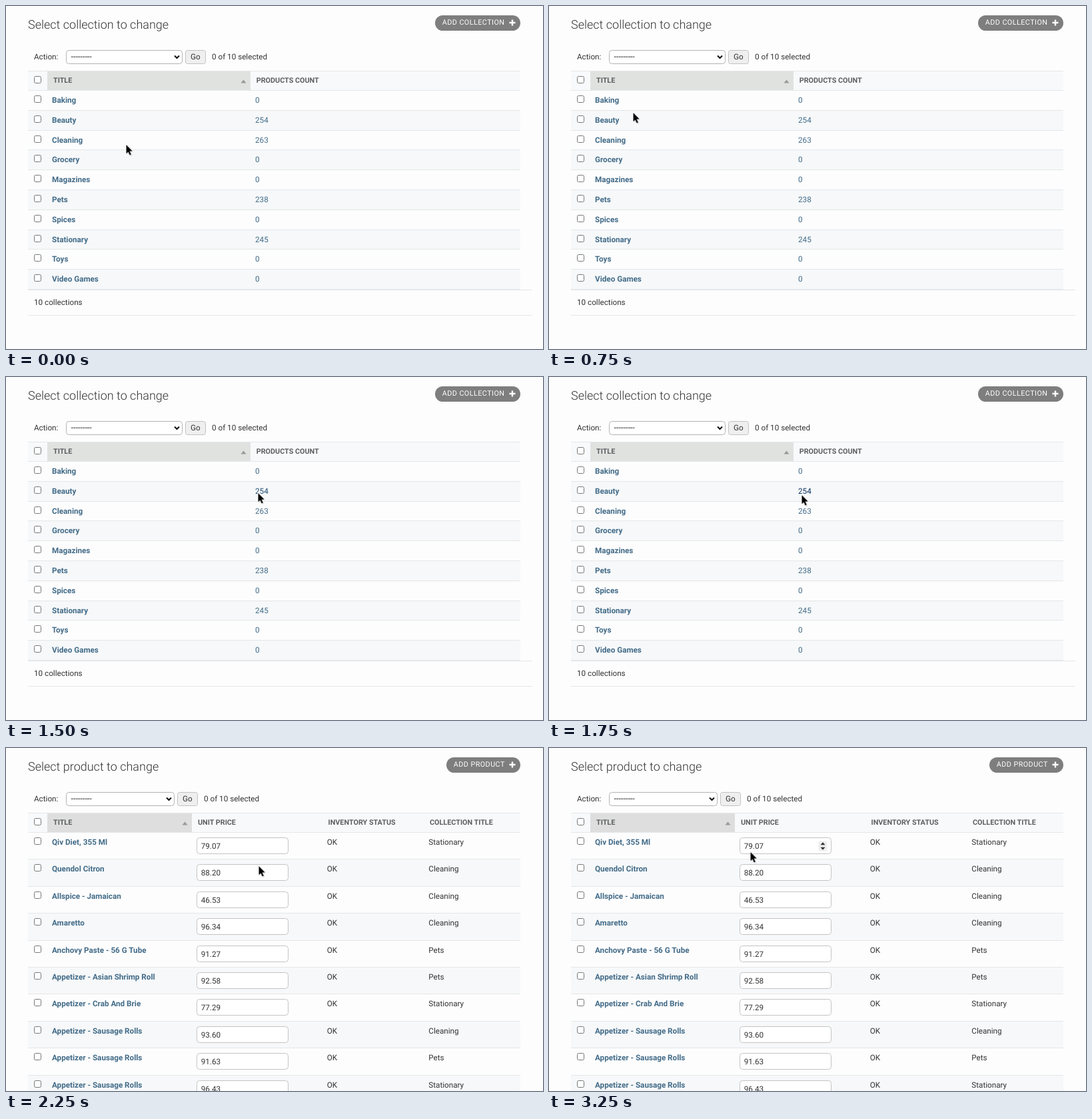
Recreate the animation shown at these times as an HTML page. Size 806x514 px, loop 4000 ms.

```html
<!DOCTYPE html>
<html lang="en">
<head>
<meta charset="utf-8">
<title>Admin list</title>
<style>
  html, body { margin: 0; width: 100%; height: 100%; overflow: hidden; background: #fdfdfd; }
  svg { display: block; width: 806px; height: 514px; }
  text { font: 11.7px Roboto, sans-serif; fill: #333; text-rendering: geometricPrecision; white-space: pre; }
  .title { font-size: 18px; font-weight: 300; fill: #333; }
  .head { font-size: 10.8px; font-weight: 700; fill: #5c5f61; }
  .name { font-weight: 700; fill: #426b88; }
  .link { fill: #426b88; }
  .add { font-size: 10.8px; letter-spacing: .45px; fill: #fff; }
  .option { font-size: 12.6px; fill: #222; }
  .box { fill: #fff; stroke: #767676; }
  .field { fill: #fff; stroke: #c4c4c4; }
  .line { fill: #e4e7e9; }
  .shade { fill: #f6f8f9; }

  .anim { animation: 4s step-end infinite; }
  #collections { animation-name: leave; }
  #products { animation-name: enter; }
  #spinner { animation-name: spinner; }
  #underline { animation-name: underline; }
  #hot { animation-name: hover; }
  #cursor { animation-name: point; }
  @keyframes leave { 0% { visibility: visible } 56.25%, 100% { visibility: hidden } }
  @keyframes enter { 0% { visibility: hidden } 56.25%, 100% { visibility: visible } }
  @keyframes spinner { 0% { opacity: 0 } 75%, 100% { opacity: 1 } }
  @keyframes underline { 0% { opacity: 0 } 50%, 100% { opacity: 1 } }
  @keyframes hover { 0% { fill: #426b88 } 37.5% { fill: #1f4a70 } 43.75%, 100% { fill: #0a2f5c } }
  @keyframes point {
    0% { transform: translate(180.5px, 208px) }
    6.25% { transform: translate(165.5px, 196px) }
    12.5% { transform: translate(156.5px, 179px) }
    18.75% { transform: translate(126.5px, 160px) }
    25% { transform: translate(361.5px, 161px) }
    31.25% { transform: translate(378.5px, 173px) }
    37.5% { transform: translate(378.5px, 174px) }
    43.75% { transform: translate(379.5px, 177px) }
    75% { transform: translate(301.5px, 155px) }
    81.25%, 100% { transform: translate(302.5px, 156px) }
  }
</style>
</head>
<body>
<svg viewBox="0 0 806 514">
  <g id="collections" class="anim"></g>
  <g id="products" class="anim"></g>
  <g id="cursor" class="anim">
    <path d="M1 1.6V14.6L4 11.8 6.2 17 8.8 15.9 6.6 11H10.4Z" fill="#000" opacity=".18"/>
    <path d="M0 0V13.2L3 10.4 5.1 15.5 7.3 14.6 5.2 9.6H9.3Z" stroke="#fff" stroke-width="1.6" paint-order="stroke"/>
  </g>
</svg>
<script>
const collections = [
  ['Baking', 0], ['Beauty', 254], ['Cleaning', 263], ['Grocery', 0], ['Magazines', 0],
  ['Pets', 238], ['Spices', 0], ['Stationary', 245], ['Toys', 0], ['Video Games', 0]
];
const products = [
  ['Qiv Diet, 355 Ml', '79.07', 'Stationary'],
  ['Quendol Citron', '88.20', 'Cleaning'],
  ['Allspice - Jamaican', '46.53', 'Cleaning'],
  ['Amaretto', '96.34', 'Cleaning'],
  ['Anchovy Paste - 56 G Tube', '91.27', 'Pets'],
  ['Appetizer - Asian Shrimp Roll', '92.58', 'Pets'],
  ['Appetizer - Crab And Brie', '77.29', 'Stationary'],
  ['Appetizer - Sausage Rolls', '93.60', 'Cleaning'],
  ['Appetizer - Sausage Rolls', '91.63', 'Pets'],
  ['Appetizer - Sausage Rolls', '96.43', 'Stationary']
];

const text = (x, y, value, cls = '', extra = '') =>
  `<text x="${x}" y="${y}" class="${cls}" ${extra}>${value}</text>`;
const rect = (x, y, w, h, attrs) =>
  `<rect x="${x}" y="${y}" width="${w}" height="${h}" ${attrs}/>`;
const checkbox = y => rect(42.5, y - 5, 10, 10, 'rx="2" class="box"');

function toolbar(right) {
  return text(42, 80, 'Action:')
    + rect(90.5, 66.5, right - 91, 20, 'rx="4" fill="#fff" stroke="#b4b4b4"')
    + text(97.5, 80, '---------', 'option')
    + `<path d="M${right - 12} 74.5l3.5 3.5 3.5-3.5" fill="none" stroke="#111" stroke-width="2"/>`
    + rect(right + 4.5, 66.5, 30, 20, 'rx="3" fill="#efefef" stroke="#c2c2c2"')
    + text(right + 12, 80, 'Go')
    + text(right + 44, 80, '0 of 10 selected');
}

function addButton(x, label) {
  return rect(x, 14, 772 - x, 23, 'rx="11.5" fill="#7e7e7e"')
    + text(x + 10.7, 28, label, 'add')
    + '<path d="M755.5 25h9M760 20.5v9" stroke="#fff" stroke-width="2.4"/>';
}

function header(sortedEnd, sortedFill, columns) {
  const x = sortedEnd - 14.5;
  return rect(33, 97, 739, 29, 'fill="#f8f9fa"')
    + rect(62, 97, sortedEnd - 62, 29, `fill="${sortedFill}"`)
    + rect(33, 97, 739, 1, 'class="line"')
    + rect(33, 126, 739, 1, 'class="line"')
    + `<path d="M${x} 115.5h8l-4-5z" fill="#999"/>`
    + checkbox(110.5)
    + columns.map(([cx, label]) => text(cx, 115, label, 'head')).join('');
}

function rows(items, pitch, cells) {
  return items.map((item, i) => {
    const top = Math.round(126 + pitch * i);
    const bottom = Math.round(126 + pitch * (i + 1));
    const base = Math.round(145 + pitch * i);
    return (i % 2 ? rect(33, top + 1, 739, bottom - top, 'class="shade"') : '')
      + rect(33, bottom, 739, 1, 'class="line"')
      + checkbox(base - 5.5)
      + text(69, base, item[0], 'name')
      + cells(item, base, i);
  }).join('');
}

document.getElementById('collections').innerHTML =
  text(33, 34, 'Select collection to change', 'title')
  + addButton(644, 'ADD COLLECTION')
  + toolbar(265)
  + header(367, '#e0e2e0', [[71, 'TITLE'], [375.7, 'PRODUCTS COUNT']])
  + rows(collections, 29.8, ([, count], y, i) =>
      text(374, y, count, i === 1 ? 'link anim' : 'link', i === 1 ? 'id="hot"' : ''))
  + rect(374, 176, 20, 1, 'id="underline" class="anim" fill="#0a2f5c"')
  + rect(33, 425, 757, 1, 'class="line"')
  + text(42, 448, '10 collections')
  + rect(33, 463, 757, 1, 'class="line"');

document.getElementById('products').innerHTML =
  text(33, 34, 'Select product to change', 'title')
  + addButton(661, 'ADD PRODUCT')
  + toolbar(253)
  + header(279, '#dedede', [[71, 'TITLE'], [288, 'UNIT PRICE'], [483.5, 'INVENTORY STATUS'], [636, 'COLLECTION TITLE']])
  + rows(products, 40.4, ([, price, collection], y) =>
      rect(286.5, y - 10.5, 137, 24, 'rx="4" class="field"')
      + text(292.7, y + 6, price)
      + text(481.7, y, 'OK')
      + text(634.3, y, collection))
  + `<g id="spinner" class="anim">${rect(404.5, 139.5, 13, 15, 'rx="2" fill="#efefef"')}
      <path d="M407.5 145.3h7l-3.5-4zM407.5 148.7h7l-3.5 4z" fill="#333"/></g>`;
</script>
</body>
</html>
```
